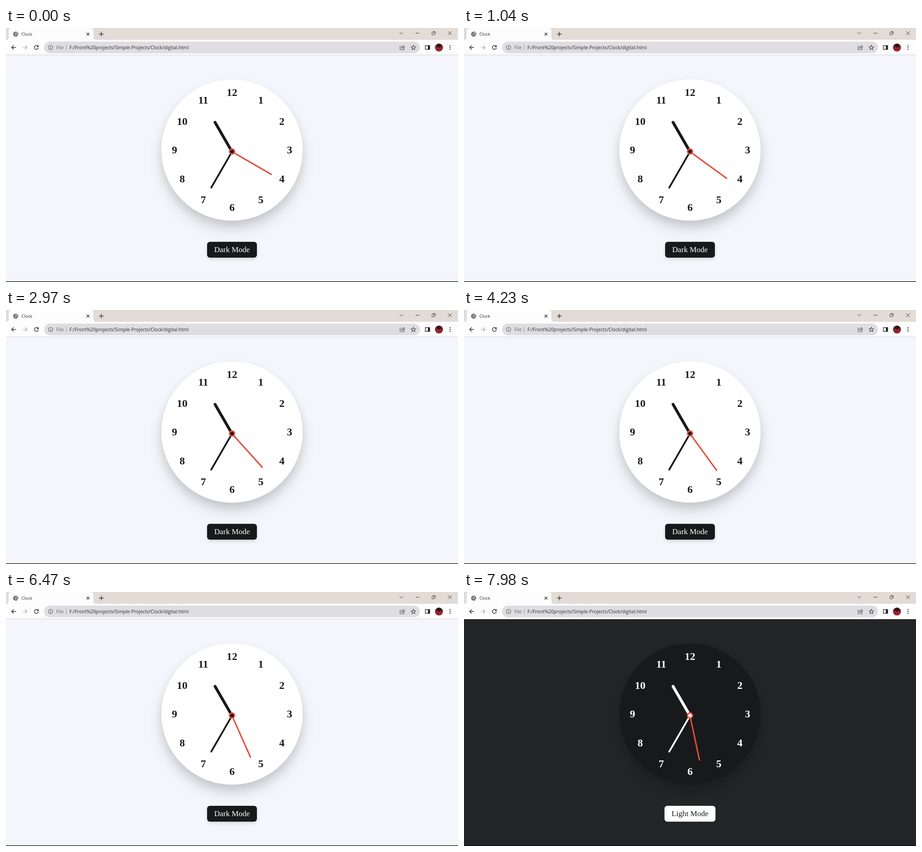
An HTML page that plays this animation: 998x561 px, repeating every 8 s.

```html
<!DOCTYPE html>
<html lang="en">
<head>
<meta charset="utf-8">
<title>Clock</title>
<style>
  html, body { margin: 0; width: 100%; height: 100%; overflow: hidden; }
  svg {
    display: block; width: 998px; height: 561px;
    --page: #f5f6fb; --face: #fff; --ink: #18191a; --label: #fff;
  }
  svg.dark { --page: #242526; --face: #18191a; --ink: #fff; --label: #18191a; }
  .page { fill: var(--page); }
  .face { fill: var(--face); }
  .ink { fill: var(--ink); }
  .shadow { opacity: .1; filter: blur(9.75px); }
  .shadow.wide { filter: blur(17.5px); }
  .shadow.small { filter: blur(4px); }
  .dark .edge { visibility: hidden; }
  .hand { fill: var(--ink); }
  #second { fill: #e74c3c; }
  .num { font: bold 23.4px "Liberation Serif", serif; fill: var(--ink); text-anchor: middle; }
  .label { font: 17.16px "Liberation Serif", serif; fill: var(--label); text-anchor: middle; }
  .ui { font: 10.4px "Open Sans", sans-serif; fill: #2b2b2e; }
  .icon { fill: none; stroke: #333; stroke-width: 1.2; }
</style>
</head>
<body>
<svg id="stage" viewBox="0 0 998 561">
  <rect class="page" width="998" height="561"/>

  <!-- browser window -->
  <rect width="998" height="27" fill="#e2dbd6"/>
  <path d="M0 26Q6 26 6 20V6Q6 0 12 0H187Q193 0 193 6V20Q193 26 199 26H998V60H0Z" fill="#fdfdfe"/>
  <rect class="edge" y="59" width="998" height="1" fill="#d2d2d4"/>
  <rect x="84" y="30" width="830" height="26" rx="13" fill="#dedee2"/>

  <circle cx="21.5" cy="13.5" r="5.6" fill="#55575b"/>
  <path d="M17.5 12.5l3 1.5v3.5M21 9l1 2.5 3.5-.5M23 14l2.5 1-1.5 2" fill="none" stroke="#fdfdfe" stroke-width="1.3"/>
  <text class="ui" x="34" y="17" style="font-size:9.6px">Clock</text>
  <path class="icon" style="stroke-width:1.4" d="M178 10.5l6 6m0-6l-6 6M205.5 13.5h10m-5-5v10"/>
  <path class="icon" style="stroke-width:1" d="M869 9.5l3.7 3.7 3.7-3.7M904.5 11.5h8M976 7.5l8 8m0-8l-8 8"/>
  <g class="icon" style="stroke-width:1">
    <rect x="940.5" y="9.5" width="5.5" height="5.5" rx="1"/>
    <path d="M942.5 7.5H946.5Q948 7.5 948 9V13"/>
  </g>

  <path class="icon" style="stroke-width:1.5" d="M22 43H12.5m4.5-4.5L12.5 43l4.5 4.5"/>
  <path class="icon" style="stroke:#a3a3a7" d="M37 43h9.5m-4.5-4.5l4.5 4.5-4.5 4.5"/>
  <path class="icon" style="stroke-width:1.5" d="M70.7 40.2A4.4 4.4 0 1 0 71.5 44"/>
  <path d="M72.2 37.5v4.7h-4.7z" fill="#333"/>
  <g class="icon" style="stroke:#5d5d61;stroke-width:1.1">
    <circle cx="98.5" cy="43" r="4.8"/>
    <path d="M98.5 42v4M98.5 39.8v1.2"/>
    <path d="M133 37v12" style="stroke:#96969a;stroke-width:1"/>
    <path d="M872 40h-2v8h9v-2.5M872.5 45q.8-4 4.5-4v-2.5l3.5 3.5-3.5 3.5v-2.5q-3-.2-4.5 2z"/>
  </g>
  <text class="ui" x="111" y="46.7" style="fill:#66666a">File</text>
  <text class="ui" x="140" y="46.7">F:/Front%20projects/Simple-Projects/Clock/digital.html</text>
  <path id="star" class="icon" style="stroke-width:1.1"/>
  <rect class="icon" x="926" y="38.7" width="9.5" height="8.6" style="stroke-width:1.4"/>
  <path d="M931.5 39h4v8h-4z" fill="#222"/>
  <circle cx="956" cy="43" r="8.8" fill="#5a2a2c"/>
  <path d="M947.4 43Q956 38 964.6 43Q963 50 956 51.5Q949 50 947.4 43Z" fill="#a51d2b"/>
  <ellipse cx="956" cy="39" rx="5" ry="4" fill="#25161a"/>
  <g fill="#333">
    <circle cx="980.5" cy="39" r="1.2"/><circle cx="980.5" cy="43" r="1.2"/><circle cx="980.5" cy="47" r="1.2"/>
  </g>

  <!-- clock -->
  <circle class="shadow" cx="499" cy="281.2" r="156"/>
  <circle class="shadow wide" cx="499" cy="289" r="156"/>
  <circle class="face" cx="499" cy="269.5" r="156"/>
  <g id="numbers"></g>
  <g transform="translate(499 273.2)">
    <rect class="hand" x="-3.1" y="-78" width="6.2" height="78" rx="3.1" transform="rotate(-30)"/>
    <rect class="hand" x="-1.95" y="-93.6" width="3.9" height="93.6" rx="1.95" transform="rotate(210)"/>
    <rect class="hand" id="second" x="-1.55" y="-101.4" width="3.1" height="101.4" rx="1.55"/>
    <circle cy="-.4" r="7" fill="#e74c3c"/>
    <circle class="ink" cy="-.4" r="3.9"/>
  </g>

  <rect class="shadow small" x="444" y="476.2" width="110" height="35" rx="6.2"/>
  <rect id="button" class="ink" y="472.2" height="35" rx="6.2"/>
  <text id="label" class="label" x="499" y="495.2"></text>

  <rect y="559.7" width="998" height="1.3" fill="#080808"/>
</svg>
<script>
  const LOOP = 8000, FIRST_TICK = 800, SWITCH = 6500;
  const get = id => document.getElementById(id);
  const polar = (cx, cy, r, turn) => {
    const a = turn * 2 * Math.PI;
    return [cx + r * Math.sin(a), cy - r * Math.cos(a)];
  };

  for (let n = 1; n <= 12; n++) {
    const text = document.createElementNS("http://www.w3.org/2000/svg", "text");
    const [x, y] = polar(499, 269.5, 127, n / 12);
    text.setAttribute("class", "num");
    text.setAttribute("x", x);
    text.setAttribute("y", y + 7.5);
    text.textContent = n;
    get("numbers").append(text);
  }

  const points = Array.from({ length: 10 }, (_, i) => polar(899.5, 43.4, i % 2 ? 2.4 : 5.3, i / 10));
  get("star").setAttribute("d", "M" + points.join("L") + "Z");

  function draw(t) {
    const dark = t >= SWITCH;
    const seconds = 20 + Math.floor((t - FIRST_TICK) / 1000 + 1);
    const width = dark ? 112.6 : 110;
    get("second").setAttribute("transform", `rotate(${seconds * 6})`);
    get("stage").classList.toggle("dark", dark);
    get("label").textContent = dark ? "Light Mode" : "Dark Mode";
    get("button").setAttribute("x", 499 - width / 2);
    get("button").setAttribute("width", width);
  }

  const start = performance.now();
  function frame() {
    draw((performance.now() - start) % LOOP);
    requestAnimationFrame(frame);
  }
  frame();
</script>
</body>
</html>
```
